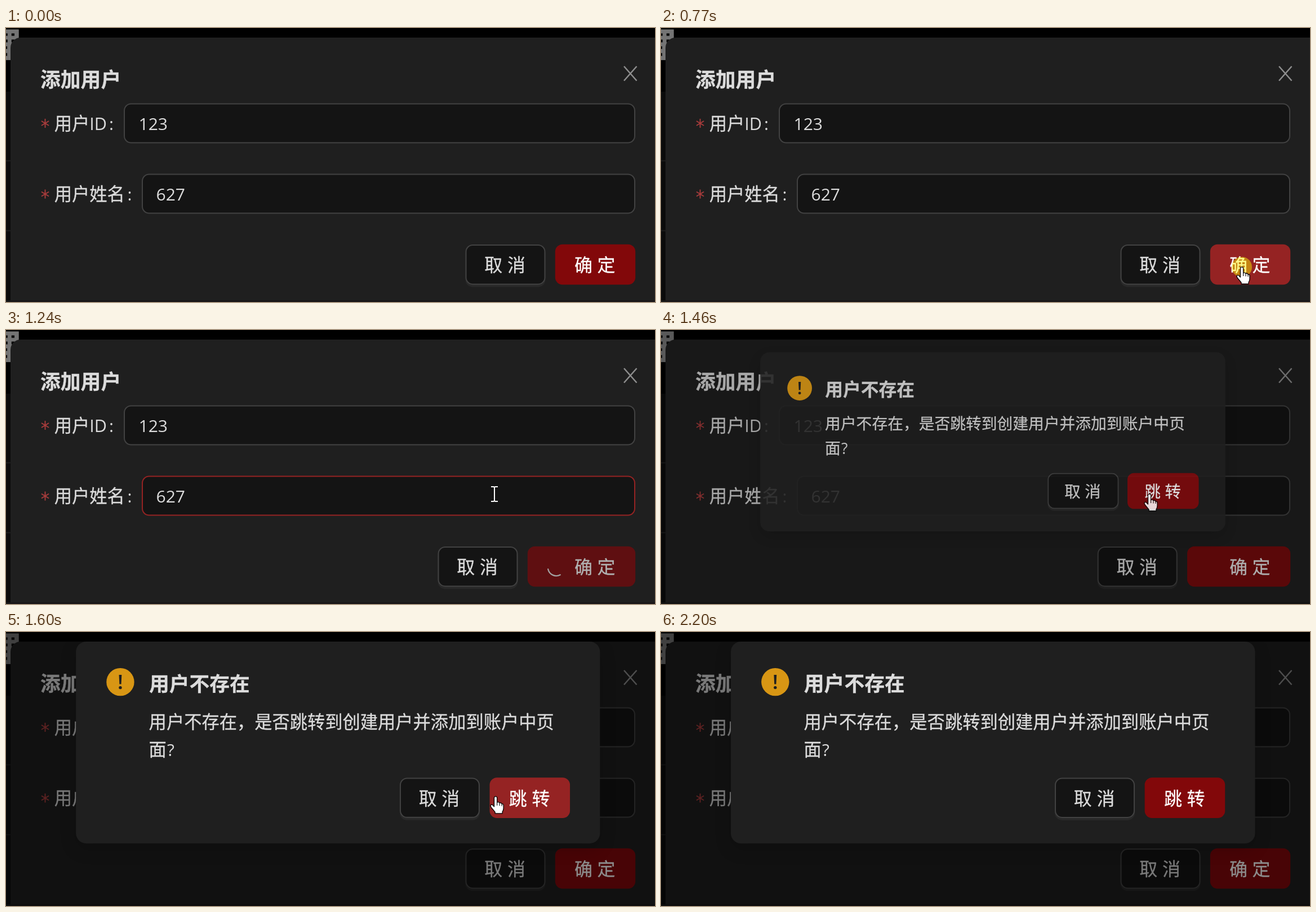
An HTML page for the animation above (2640 ms loop, 1152 by 486 pixels).

```html
<!DOCTYPE html>
<html lang="zh-CN">
<head>
<meta charset="utf-8">
<title>添加用户</title>
<style>
  html, body { margin: 0; width: 100%; height: 100%; overflow: hidden; background: #000; }
  svg { display: block; width: 100%; height: 100%; }
  text {
    font: 400 31.3px "Noto Sans CJK SC", "Noto Sans CJK", sans-serif;
    fill: #dcdcdc; stroke: #dcdcdc; stroke-width: .3; white-space: pre;
  }
  .latin { font: 400 30px "Open Sans", "Noto Sans", sans-serif; stroke: none; }
  .title { font-size: 35.8px; font-weight: 700; }
  .btn { font-size: 32px; letter-spacing: 8.6px; }
  .white { fill: #fff; stroke: #fff; }
  .page { font-size: 61px; font-weight: 700; fill: #747474; stroke: #747474; stroke-width: .8; }
  .field { fill: #141414; stroke: #424242; stroke-width: 2; }
  .star { stroke: #a83c3c; stroke-width: 1.9; fill: none; }
  #dialog2 { filter: drop-shadow(0 10px 14px rgba(0, 0, 0, .16)); }
  .cursor { fill: #fff; stroke: #000; stroke-width: 1.3; stroke-linejoin: round; }
</style>
</head>
<body>
<svg viewBox="0 0 1152 486">
  <defs>
    <path id="star" class="star" d="M0-8V8M-6.6-4L6.6 4M-6.6 4L6.6-4"/>
    <g id="cancel">
      <rect y="4.4" width="142" height="71" rx="13" fill="#fff" fill-opacity=".045"/>
      <rect class="field" x="1" y="1" width="140" height="69.4" rx="12"/>
      <text class="btn" x="33.8" y="48.2">取消</text>
    </g>
  </defs>

  <!-- page behind -->
  <rect width="1152" height="486" fill="#000"/>
  <rect y="113" width="10" height="373" fill="#0b0b0b"/>
  <path d="M0 235.5H10M0 359.5H10M0 484.5H10" stroke="#1d1d1d" stroke-width="2"/>
  <text class="page" x="-34.5" y="53">理</text>

  <!-- form dialog -->
  <path d="M8 486V35A18 18 0 0 1 26 17H1152V486Z" fill="#1f1f1f"/>
  <rect x="8" y="483" width="1144" height="3" fill="#191718"/>
  <text class="title" x="61" y="104.5">添加用户</text>
  <path d="M1097 68L1119.5 93.5M1119.5 68L1097 93.5" stroke="#8e8e8e" stroke-width="2.5"/>

  <use href="#star" x="69.5" y="169"/>
  <text x="85.7" y="181.2">用户</text>
  <text class="latin" x="148.3" y="181" style="font-size:30.5px">ID</text>
  <text class="latin" x="183" y="181">:</text>
  <rect class="field" x="210" y="134.5" width="906" height="69" rx="12"/>
  <text class="latin" x="235.5" y="181">123</text>

  <use href="#star" x="69.5" y="294.5"/>
  <text x="85.7" y="306.3">用户姓名</text>
  <text class="latin" x="215.5" y="306">:</text>
  <rect id="nameField" class="field" x="242" y="259.5" width="874" height="69" rx="12"/>
  <text class="latin" x="266.5" y="306">627</text>

  <use id="cancel1" href="#cancel"/>
  <rect id="wave" fill="none" stroke="#82080a"/>
  <g id="ok">
    <rect id="okBox" y="383.8" height="71.4" rx="13"/>
    <path id="spin" fill="none" stroke="#e8e8e8" stroke-width="2.3" stroke-linecap="round"/>
    <text class="btn white" x="1009" y="432.2">确定</text>
  </g>

  <rect id="mask" width="1152" height="486" fill="#000"/>

  <!-- confirm dialog -->
  <g id="dialog2">
    <rect x="124" y="17" width="930.5" height="358" rx="18" fill="#1f1f1f"/>
    <circle cx="202.8" cy="88.6" r="24.7" fill="#d89614"/>
    <path d="M200.4 76H205.2L204.4 92.5H201.2Z" fill="#1f1f1f"/>
    <circle cx="202.8" cy="98.6" r="2.7" fill="#1f1f1f"/>
    <text class="title" x="253.8" y="104.5">用户不存在</text>
    <text x="253.5" y="170.6">用户不存在，是否跳转到创建用户并添加到账户中页</text>
    <text x="253.5" y="220">面</text>
    <text class="latin" x="286" y="220">?</text>
    <use href="#cancel" x="699" y="258.5"/>
    <rect id="goBox" x="858.6" y="258.3" width="142.6" height="71.8" rx="13"/>
    <text class="btn white" x="893" y="306.8">跳转</text>
  </g>

  <circle id="press" cx="1031" cy="424" r="18" fill="#ff0" fill-opacity=".45"/>
  <g id="pointer">
    <g id="hand">
      <path class="cursor" d="M-2.6 2.4A2.6 2.6 0 0 1 2.6 2.4V10.5Q4.8 8.8 7 11.3Q9.6 10.2 11 13Q14 12.6 14 16V21Q14 24 12 27V30H-1V27.5L-8 19Q-9.8 16-8.4 14.8Q-6.4 13.6-4.4 16L-2.6 18Z"/>
      <path d="M2.6 10.5V16M7 11.3V16.5M11 13V17" stroke="#000" stroke-width="1.1"/>
    </g>
    <path id="arrow" class="cursor" d="M0 0V24L5.4 19L9 27.4L12.8 25.8L9.3 17.6H16.6Z"/>
    <path id="beam" d="M-6-13H-2Q0-13 0-11Q0-13 2-13H6M0-11V11M-6 13H-2Q0 13 0 11Q0 13 2 13H6" fill="none" stroke="#fff" stroke-width="2"/>
  </g>
</svg>
<script>
const LOOP = 2640;
const $ = id => document.getElementById(id);
const set = (id, attrs) => { for (const k in attrs) $(id).setAttribute(k, attrs[k]); };
const show = (id, on) => set(id, { visibility: on ? "visible" : "hidden" });
const mix = (a, b, p) => a + (b - a) * p;
const span = (t, start, length) => Math.min(1, Math.max(0, (t - start) / length));
const blend = (a, b, p) => `rgb(${a.map((v, i) => Math.round(mix(v, b[i], p)))})`;
const smooth = p => p * p * (3 - 2 * p);

// CSS-style cubic-bezier easing, solved by bisection
function bezier(x1, y1, x2, y2) {
  const at = (a, b, s) => 3 * (1 - s) ** 2 * s * a + 3 * (1 - s) * s * s * b + s ** 3;
  return x => {
    if (x <= 0 || x >= 1) return x <= 0 ? 0 : 1;
    let lo = 0, hi = 1;
    for (let i = 0; i < 24; i++) {
      const mid = (lo + hi) / 2;
      if (at(x1, x2, mid) < x) lo = mid; else hi = mid;
    }
    return at(y1, y2, lo);
  };
}
const inOut = bezier(.645, .045, .355, 1);
const circOut = bezier(.08, .82, .17, 1);

const RED = [130, 8, 10], RED_HOVER = [149, 35, 35];
const GREY = [66, 66, 66], BORDER_HOVER = [149, 35, 35];

// start, length, from, control, to
const moves = [
  [120, 400, [1056, 486], [1042, 450], [1031, 424]],
  [880, 330, [1031, 424], [949, 357], [867, 291]],
  [1540, 270, [867, 291], [875, 294], [884, 300]],
  [1890, 310, [884, 300], [905, 400], [1012, 490]]
];

function pointerAt(t) {
  const [start, length, a, b, c] = moves.filter(m => t >= m[0]).pop() || moves[0];
  const p = smooth(span(t, start, length));
  return a.map((v, i) => (1 - p) ** 2 * v + 2 * p * (1 - p) * b[i] + p * p * c[i]);
}

function pointerShape(t, y) {
  if (t < 870) return y < 455 ? "hand" : "arrow";
  if (t < 1400) return y < 330 ? "beam" : "arrow";
  if (t < 1440) return "arrow";
  return y < 330 ? "hand" : "arrow";
}

function drawForm(t) {
  const open = inOut(span(t, 860, 214)), close = inOut(span(t, 1390, 214));
  const extra = 49 * (open - close);
  const left = 974.8 - extra;
  const hover = span(t, 270, 143) - span(t, 950, 143);
  const fade = span(t, 860, 100) - span(t, 1380, 125);
  set("cancel1", { transform: `translate(${815.5 - extra} 384)` });
  set("okBox", { x: left, width: 142.4 + extra, fill: blend(RED, RED_HOVER, hover) });
  set("ok", { opacity: 1 - .35 * fade });

  const point = deg => {
    const r = deg * Math.PI / 180;
    return `${left + 51 + 15 * Math.cos(r)} ${421 + 15 * Math.sin(r)}`;
  };
  const turn = (t - 1240) * 360 / 714;
  set("spin", {
    d: `M${point(turn + 62)}A15 15 0 0 1 ${point(turn + 167)}`,
    opacity: open * (1 - span(t, 1390, 65))
  });

  const ring = circOut(span(t, 845, 290)) * 13;
  set("wave", {
    x: left - ring / 2, y: 384 - ring / 2, width: 142 + extra + ring, height: 71 + ring,
    rx: 13 + ring / 2, "stroke-width": ring,
    opacity: t < 845 ? 0 : .25 * (1 - span(t, 845, 380))
  });

  const focus = span(t, 1120, 110) - span(t, 1390, 70);
  $("nameField").style.stroke = blend(GREY, BORDER_HOVER, focus);
}

function drawConfirm(t) {
  set("mask", { opacity: .45 * span(t, 1385, 145) });
  const p = circOut(span(t, 1402, 214));
  const hover = span(t, 1452, 70) - span(t, 1945, 143);
  show("dialog2", p > 0);
  set("dialog2", {
    opacity: p,
    transform: `translate(587 217) scale(${mix(.2, 1, p)}) translate(-587 -217)`
  });
  set("goBox", { fill: blend(RED, RED_HOVER, hover) });
}

function drawPointer(t) {
  const [x, y] = pointerAt(t);
  const visible = t >= 120 && t < 2200;
  const shape = pointerShape(t, y);
  for (const id of ["hand", "arrow", "beam"]) show(id, visible && id === shape);
  set("pointer", {
    transform: `translate(${x} ${y})`,
    opacity: t > 1400 && t < 1550 ? .84 : 1
  });
  show("press", t >= 770 && t < 850);
}

function draw(t) {
  drawForm(t);
  drawConfirm(t);
  drawPointer(t);
}

const began = performance.now();
function tick() {
  draw((performance.now() - began) % LOOP);
  requestAnimationFrame(tick);
}
draw(0);
requestAnimationFrame(tick);
</script>
</body>
</html>
```
